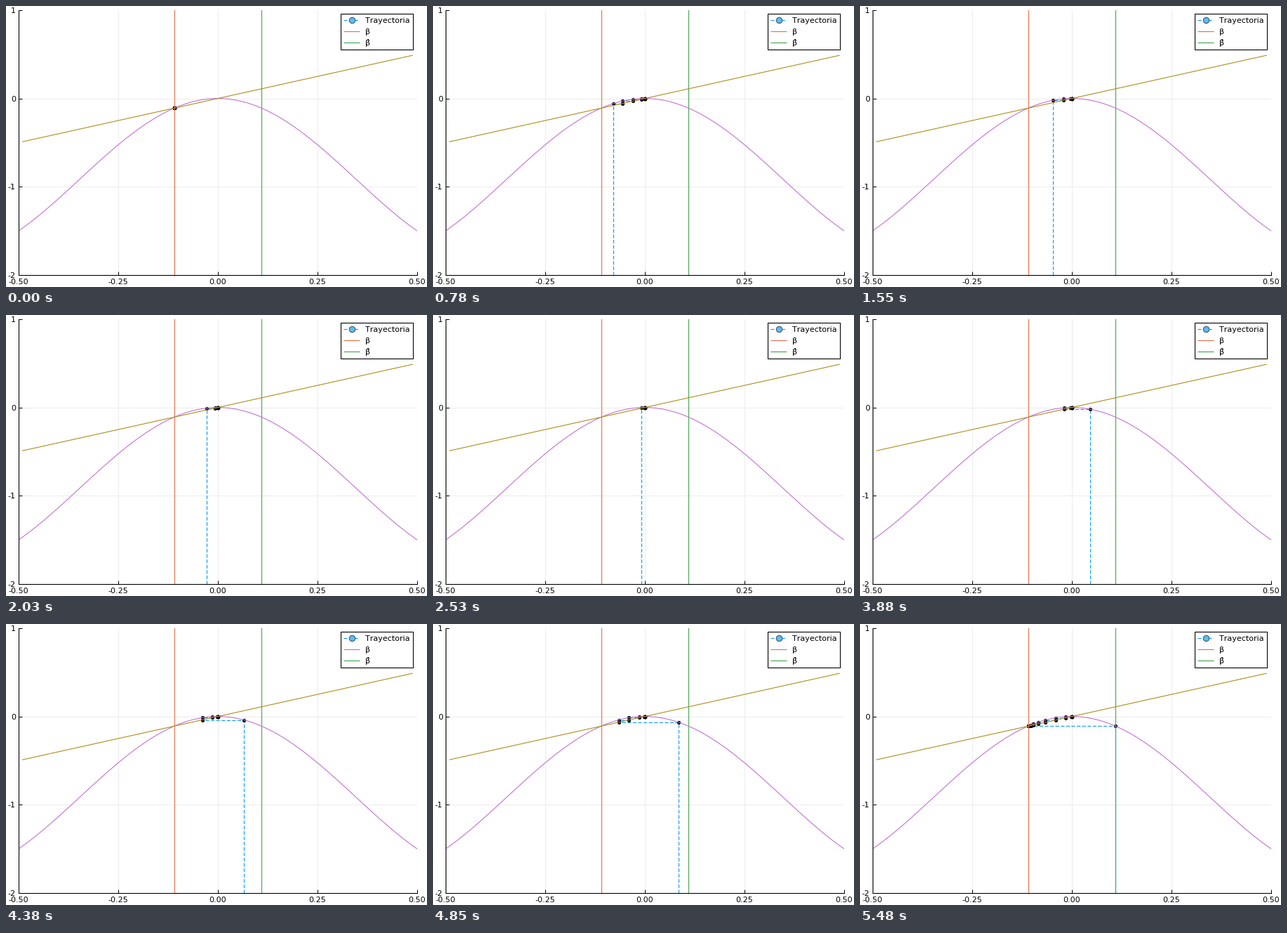
Recreate the animation shown at these times as a matplotlib script. Size 600 by 400 pixels, loop 5.51 s.

```python
import numpy as np
import matplotlib.pyplot as plt
from matplotlib.animation import FuncAnimation
from matplotlib.patches import Rectangle

W, H, DPI = 600, 400, 100
LOOP, TICK, STEP_MS = 5510, 10, 25
ITERS, FREQ, DX = 20, 3.1, 0.001
BLUE, ORANGE, GREEN = "#009afa", "#e36f47", "#3ea44e"
PURPLE, GOLD = "#c371d2", "#ac8e18"

plt.rcParams.update({"font.family": "DejaVu Sans", "font.size": 8,
                     "text.kerning_factor": 6})


def pt(px):
    return px * 72 / DPI


LW = pt(1.1)
DASH = (0, (4.6, 2.3))


def f(x):
    return -3 * x * np.sin(FREQ * x)


# Repelling fixed point of f is -beta; +beta is its other preimage
beta = np.arcsin(1 / 3) / FREQ
starts = np.arange(-beta, beta, DX)


def cobweb(x):
    """Corners of the staircase from the bottom edge up to the attractor."""
    pts = [(x, -2)]
    for _ in range(ITERS):
        y = f(x)
        pts += [(x, y), (y, y)]
        x = y
    return np.array(pts).T


fig = plt.figure(figsize=(W / DPI, H / DPI), dpi=DPI, facecolor="white")
left, top, width, height = 17.95, 5.95, 568, 377
ax = fig.add_axes([left / W, 1 - (top + height) / H, width / W, height / H])
ax.set(xlim=(-0.5, 0.5), ylim=(-2, 1))
ax.spines[["top", "right"]].set_visible(False)
ax.spines[["left", "bottom"]].set_linewidth(LW)
xticks, yticks = np.linspace(-0.5, 0.5, 5), range(-2, 2)
ax.set_xticks(xticks, [f"{v:.2f}" for v in xticks])
ax.set_yticks(yticks, [str(v) for v in yticks])
ax.tick_params(direction="in", length=pt(5), width=pt(1))
ax.tick_params(axis="x", pad=pt(5.35))
ax.tick_params(axis="y", pad=pt(4))

for v in xticks[1:-1]:
    ax.axvline(v, color="#ececec", lw=pt(1), zorder=0.5)
for v in (-1, 0):
    ax.axhline(v, color="#ececec", lw=pt(1), zorder=0.5)

path, = ax.plot([], [], color=BLUE, lw=LW, ls=DASH)
dots, = ax.plot([], [], "o", color="black", ms=pt(5.2), mew=0)
ax.axvline(-beta, color=ORANGE, lw=LW)
ax.axvline(beta, color=GREEN, lw=LW)
xs = np.linspace(-0.5, 0.5, 201)
ax.plot(xs, f(xs), color=PURPLE, lw=LW)
ax.plot([-0.49, 0.488], [-0.49, 0.488], color=GOLD, lw=LW)

# Legend, laid out in pixels
key = fig.add_axes([0, 0, 1, 1])
key.set(xlim=(0, W), ylim=(H, 0))
key.axis("off")
key.add_patch(Rectangle((477.3, 11.3), 103, 51, fc="white", ec="black",
                        lw=LW, joinstyle="round"))
rows = [("Trayectoria", BLUE, DASH), ("β", ORANGE, "-"), ("β\u0302", GREEN, "-")]
for i, (label, color, style) in enumerate(rows):
    y = 20.4 + 15.8 * i
    key.plot([481, 504.3], [y, y], color=color, lw=LW, ls=style,
             solid_capstyle="butt")
    key.text(512, y + 3.7, label, va="baseline")
key.plot(492.5, 20.4, "o", ms=pt(8.4), mfc="#5cbcf4", mec="#3f5a68", mew=pt(1.1))


def update(i):
    n = min(i * TICK // STEP_MS, len(starts) - 1)
    x, y = cobweb(starts[n])
    path.set_data(x, y)
    dots.set_data(x[1:], y[1:])
    return path, dots


anim = FuncAnimation(fig, update, frames=LOOP // TICK, interval=TICK,
                     repeat=True, repeat_delay=0, blit=False)
plt.show()
```
